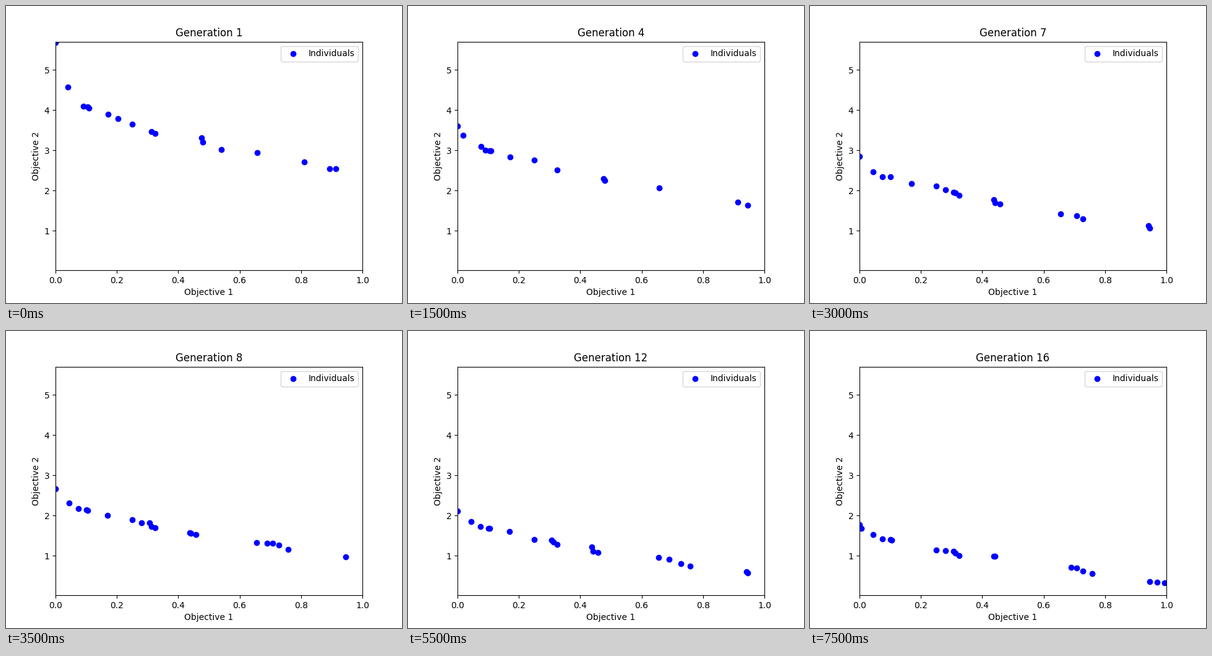
A matplotlib script that plays this animation: 640x480 px, repeating every 8000 ms.

```python
import numpy as np
import matplotlib.pyplot as plt
from matplotlib.animation import FuncAnimation

GENERATIONS = 16
EARLY = np.array([0, .018, .04, .077, .091, .104, .108, .171, .204, .25, .313,
                  .325, .476, .48, .54, .657, .81, .893, .913, .945])
LATE = np.array([0, .006, .045, .075, .1, .104, .17, .25, .28, .306, .313, .325,
                 .438, .442, .458, .655, .69, .708, .728, .758, .942, .945,
                 .97, .994])


def distance(gen, x):
    """Convergence term g, shrinking towards the optimum."""
    base = 1.3 + 3.85 * np.exp(-0.13 * gen)
    outliers = np.exp(-30 * x) / gen**3
    return base + outliers + 0.5 * x * (0.6 - x)


def front(gen):
    """Pareto front of ZDT1, f2 = g - sqrt(g * f1), with seeded scatter."""
    rng = np.random.default_rng(gen)
    x = EARLY if gen < 6 else LATE
    x = x[x < np.interp(gen, [2, 3, 12, 13], [.92, .95, .95, 1])]
    alive = rng.random(x.size) < 0.87
    alive[[0, -1]] = True
    x = x[alive]
    scatter = 0.25 * np.sqrt(x * (1 - x)) * rng.uniform(-1, 1, x.size)
    g = distance(gen, x) + scatter
    y = np.sort(g - np.sqrt(g * x))[::-1]  # no individual dominates another
    return np.column_stack([x, y])


fig, ax = plt.subplots(figsize=(6.4, 4.8), dpi=100)
points = ax.scatter([], [], color="blue", label="Individuals")
title = ax.set_title("Generation 1")
ax.set(xlim=(0, 1), ylim=(0.02, 5.7), xlabel="Objective 1", ylabel="Objective 2")
ax.legend(loc="upper right")


def update(i):
    points.set_offsets(front(i + 1))
    title.set_text(f"Generation {i + 1}")
    return points, title


anim = FuncAnimation(fig, update, frames=GENERATIONS, interval=500, repeat=True)
plt.show()
```
